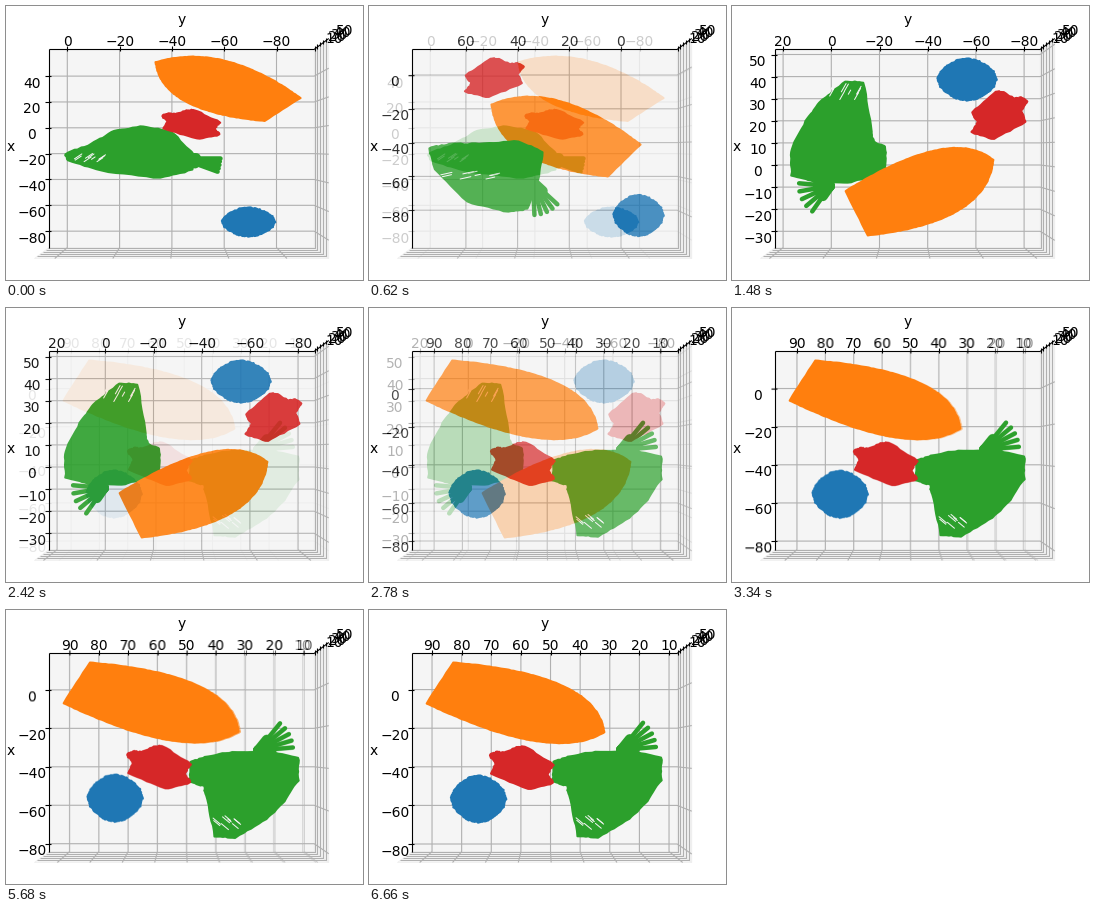
Write a matplotlib script that moves like this. It is 357x274 px and loops after 6860 ms.

```python
import numpy as np
import matplotlib.pyplot as plt
from matplotlib.animation import FuncAnimation

W, H, DPI = 357, 274, 100
PX = 72 / DPI
HOLD, STEP, FADES = 200, 60, 10
PERIOD = HOLD + STEP * (FADES - 1)
LOOP, TICK = 6860, 20

BLUE, ORANGE, GREEN, RED = "#1f77b4", "#ff7f0e", "#2ca02c", "#d62728"
FLOOR, WALL_X, WALL_Y, GRID = "#f5f5f5", "#f8f8f8", "#f2f2f2", "#b0b0b0"
LEFT, RIGHT, TOP, BOTTOM = 43.0, 308.2, 43.4, 241.6
CENTRE = np.array([175.6, 142.5])

plt.rcParams["font.family"] = "DejaVu Sans"
fig = plt.figure(figsize=(W / DPI, H / DPI), dpi=DPI, facecolor="white")
ax = fig.add_axes([0, 0, 1, 1])


# --- box with grid, axes and labels, seen from above ---

def lift(p, depth):
    """Move a floor point towards the viewer, depth 0 to 1."""
    return CENTRE + (np.array(p) - CENTRE) / (1 - 0.099 * depth)


def line(*pts, color=GRID, z=2):
    ax.plot(*zip(*pts), color=color, lw=0.8, zorder=z, solid_capstyle="butt")


def label(x, y, value, va="top"):
    text = str(value).replace("-", "\u2212")
    ax.text(x, y, text, fontsize=10, ha="center", va=va, zorder=4)


def frame(y0, y_unit, y_ticks, x0, x_unit, x_ticks):
    """The y axis runs across the picture, the x axis runs down it."""
    ax.clear()
    ax.set(xlim=(0, W), ylim=(H, 0))
    ax.axis("off")
    tl, tr, br, bl = (LEFT, TOP), (RIGHT, TOP), (RIGHT, BOTTOM), (LEFT, BOTTOM)
    for color, pts in ((FLOOR, [tl, tr, br, bl]),
                       (WALL_X, [bl, br, lift(br, 1), lift(bl, 1)]),
                       (WALL_Y, [tr, br, lift(br, 1), lift(tr, 1)])):
        ax.add_patch(plt.Polygon(pts, fc=color, ec="#ededed", lw=0.5))

    for v in x_ticks:
        y = x0 + x_unit * v
        line((LEFT, y), (RIGHT, y), lift((RIGHT, y), 1))
        line((LEFT - 4, y), (LEFT + 2, y), color="black", z=3)
        label(26, y + 0.5, v)
    for v in y_ticks:
        x = y0 + y_unit * v
        line((x, TOP), (x, BOTTOM), lift((x, BOTTOM), 1))
        line((x, TOP - 3), (x, TOP + 1.6), color="black", z=3)
        label(x, 29, v)
    for v in range(10, 51, 10):
        depth = 0.05 + 0.0195 * (v - 10)
        line(*(lift(p, depth) for p in (bl, br, tr)))
        x, y = lift(tr, depth)
        line((x, y - 3), (x, y + 1.6), color="black", z=3)
        label(x + 19, y - 17, v)

    for end in (tl, lift(tr, 1)):
        line(tr, end, color="black", z=3)
    line(tl, bl, color="black", z=3)
    label(176, 14, "y", "center")
    label(5, 141, "x", "center")


# --- dotted bodies: unit outlines, placed by centre and half size ---

def blob(color, outline, cx=0, cy=0, sx=1, sy=1, rough=0.6):
    """Fill an outline whose edge is as uneven as a cloud of dots."""
    rng = np.random.default_rng(5)
    p = np.array(outline) * (sx, sy) + (cx, cy)
    t = np.linspace(0, 1, 8, endpoint=False)[:, None]
    edge = np.concatenate([a + (b - a) * t for a, b in zip(p, np.roll(p, -1, 0))])
    edge += rng.uniform(-rough, rough, edge.shape)
    ax.add_patch(plt.Polygon(edge, fc=color, ec=color, lw=2 * PX,
                             joinstyle="round", zorder=5))


def stroke(color, width, start, step):
    (x, y), (dx, dy) = start, step
    ax.plot([x, x + dx], [y, y + dy], color=color, lw=width * PX,
            solid_capstyle="round", zorder=5)


def ball(cx, cy, sx, sy):
    a = np.linspace(0, 2 * np.pi, 16, endpoint=False)
    r = 0.97 + 0.03 * np.cos(4 * a)
    blob(BLUE, np.c_[r * np.cos(a), r * np.sin(a)], cx, cy, sx, sy)


def horn(cx, cy, sx, sy, skew=0):
    """A cut end with two corners that narrows to a round tip."""
    corner, heel, tip = (1, skew), (0.7 - 0.7 * skew, 1), (-1, -0.7 - 0.5 * skew)

    def curve(p, q, r):
        t = np.linspace(0, 1, 12)[:, None]
        return (1 - t)**2 * np.array(p) + 2 * t * (1 - t) * np.array(q) + t**2 * np.array(r)

    back = curve(corner, (-0.43 + 1.3 * skew, -1.48), tip)
    belly = curve(tip, (-0.92, 0.71), heel)
    blob(ORANGE, np.r_[back, belly[1:]], cx, cy, sx, sy, rough=0.2)


def bone(cx, cy, sx, sy):
    outline = [(-1, -.6), (-.8, -.75), (-.55, -.7), (-.1, -1), (.12, -1),
               (1, -.15), (.8, .3), (1, .7), (.2, 1), (-.95, .25), (-.8, -.2)]
    blob(RED, outline, cx, cy, sx, sy)


def fan(origin, angle, spread, length):
    """A palm with five fingers."""
    for a in np.radians(np.linspace(angle - spread / 2, angle + spread / 2, 5)):
        way = length * np.array([np.cos(a), np.sin(a)])
        stroke(GREEN, 4.5, origin, way)
        stroke(GREEN, 10, origin, way * 0.4)


def streaks(cx, cy, w, h, step, n=9):
    """Gaps between the dots."""
    rng = np.random.default_rng(3)
    for x, y, s in rng.uniform(-1, 1, (n, 3)):
        stroke(FLOOR, 1, (cx + w * x, cy + h * y), np.array(step) * (1 + 0.4 * s))


def torso(cx, cy, sx, sy):
    outline = [(-.97, 0), (-.68, -.4), (-.4, -.66), (.15, -.97), (.52, -.95),
               (.68, -.25), (.72, -.1), (.97, -.03), (.96, .3), (.7, .4),
               (.2, .48), (-.5, .47), (-.97, .38)]
    blob(GREEN, outline, cx, cy, sx, sy)


# --- poses ---

def flat():
    frame(61.3, -2.615, range(0, -81, -20), 121.8, -1.292, range(40, -81, -20))
    ball(242.5, 216, 26.5, 14.5)
    horn(222, 83, 72.5, 32, 0.28)
    blob(GREEN, [(59, 148), (85, 138), (108, 125), (138, 120), (166, 126),
                 (188, 149), (186, 164), (155, 172), (95, 165), (62, 154)])
    fan((174, 152), 10, 20, 40)
    streaks(80, 155, 14, 4, (6, -4))
    bone(185, 118.5, 29, 14.5)


def tilted():
    frame(252, -2.585, range(60, -1, -20), 69, -1.69, range(0, -81, -20))
    ball(269.5, 209.5, 25, 20.5)
    horn(197, 130.5, 74.5, 40, 0.2)
    blob(GREEN, [(60, 142), (80, 138), (110, 138), (150, 135), (174, 146),
                 (168, 178), (158, 203), (140, 206), (98, 196), (66, 163)])
    fan((164, 176), 65, 45, 33)
    streaks(95, 172, 28, 6, (9, -2))
    bone(125.5, 72, -29, 19.5)


def turned():
    frame(99.3, -2.41, range(20, -81, -20), 159, -2.21, range(50, -31, -10))
    ball(235, 73.5, 29.5, 21)
    torso(106.5, 143, 48.5, 70)
    fan((98, 180), 155, 60, 31)
    streaks(110, 92, 16, 9, (4, -7))
    horn(187.5, 185, -74, 44.5)
    bone(267.5, 109.5, -27.5, 24)


def settled(u):
    """Mirrored pose that drifts a little as u goes from 0 to 1."""
    unit = -2.8275 - 0.135 * u
    frame(319.6 + 10.05 * u, unit, range(90, 9, -10),
          80.6 - u, -1.905 - 0.025 * u, range(0, -81, -20))
    ball(108 + 1.5 * u, 186 + 3 * u, 27.5, 23.5)
    horn(143 + 3.5 * u, 92.5 + u, -85.5 - 3.5 * u, -40 - u)
    torso(238, 171 - u, -56, -59)
    fan((252, 142 - 2 * u), -28, 46, 35)
    streaks(217, 213 - u, 12, 8, (6, 5))
    bone(153.5 - u, 156 + 2 * u, 32, 21.5)


def render(pose, *args):
    pose(*args)
    fig.canvas.draw()
    return np.array(fig.canvas.buffer_rgba())[..., :3].astype(float)


poses = [render(p) for p in (flat, tilted, turned, turned)]
poses += [render(settled, i / 5) for i in range(6)]

ax.remove()
image = fig.figimage(poses[0].astype(np.uint8))


def update(i):
    n, rest = divmod(i * TICK, PERIOD)
    mix = 0 if rest < HOLD else ((rest - HOLD) // STEP + 1) / FADES
    after = poses[min(n + 1, len(poses) - 1)]
    image.set_data(np.round(poses[n] * (1 - mix) + after * mix).astype(np.uint8))
    return [image]


anim = FuncAnimation(fig, update, frames=LOOP // TICK, interval=TICK,
                     repeat=True, repeat_delay=0, blit=False)
plt.show()
```
